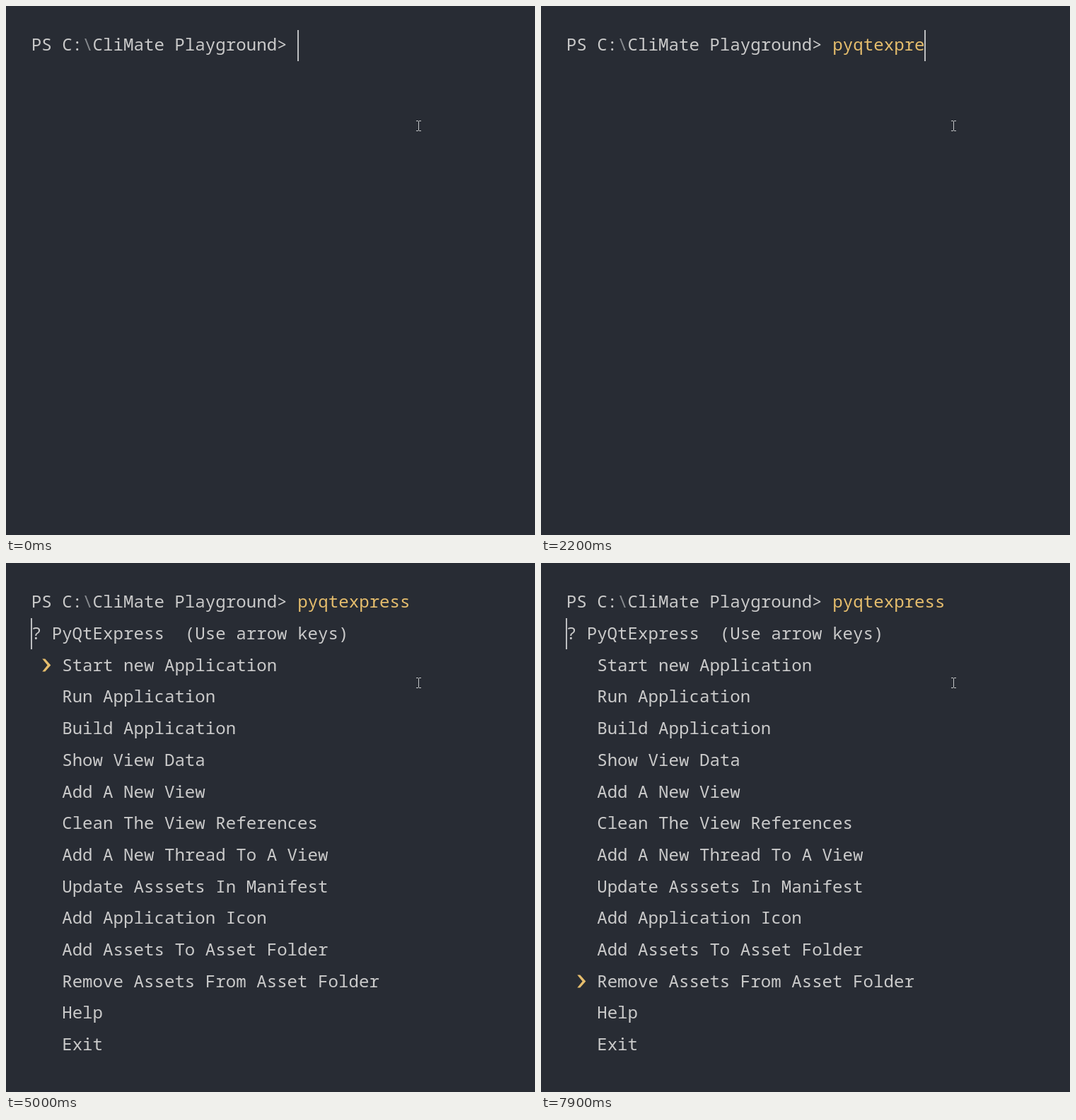
These frames come from a looping animation (748 px wide and 748 px high, 8 s). An HTML page with a canvas:

```html
<!DOCTYPE html>
<html lang="en">
<head>
<meta charset="utf-8">
<title>Terminal menu</title>
<style>
html, body { margin: 0; width: 100%; height: 100%; overflow: hidden; background: #282c34; }
canvas { display: block; }
</style>
</head>
<body>
<canvas id="stage" width="748" height="748"></canvas>
<script>
const ctx = document.getElementById('stage').getContext('2d');
const LOOP = 8000, LEFT = 35.7, CELL = 14.485, ROW = 44.7;
const BACK = '#282c34', TEXT = '#cacaca', DIM = '#868a8e', GOLD = '#e5bd6d', CARET = '#bcbec0';

const PROMPT = 'PS C:\\CliMate Playground> ';
const COMMAND = 'pyqtexpress';
const QUESTION = '? PyQtExpress  (Use arrow keys)';
const MENU = [
  'Start new Application', 'Run Application', 'Build Application', 'Show View Data',
  'Add A New View', 'Clean The View References', 'Add A New Thread To A View',
  'Update Asssets In Manifest', 'Add Application Icon', 'Add Assets To Asset Folder',
  'Remove Assets From Asset Folder', 'Help', 'Exit'
];

// Times in ms of each key press
const TYPED = [200, 400, 600, 800, 1300, 1500, 1700, 1900, 2100, 2300, 2400];
const ENTER = 2900, MENU_AT = 3600;
const DOWN = [5400, 5600, 5800, 6000, 6100, 6300, 6400, 6600, 6900, 7500, 7700, 7900];
const UP = [7100, 7300];

const passed = (times, t) => times.filter(at => at <= t).length;

function write(text, col, row, color) {
  ctx.fillStyle = color;
  ctx.fillText(text, LEFT + col * CELL, Math.round(63.3 + row * ROW));
}

function caret(col, row) {
  ctx.fillStyle = CARET;
  ctx.fillRect(Math.round(35 + col * CELL), Math.round(33.5 + row * ROW), 2, 44);
}

function pointer(row) {
  const y = 144.5 + (row - 2) * ROW;
  ctx.fillStyle = GOLD;
  ctx.beginPath();
  for (const [x, dy] of [[51.3, -9], [55.3, -9], [63.3, 0], [55.3, 9], [51.3, 9], [58.6, 0]])
    ctx.lineTo(x, y + dy);
  ctx.fill();
}

function mouse() {
  ctx.fillStyle = '#c4c6c8';
  ctx.fillRect(583, 163, 1, 13);
  for (const y of [162, 176]) {
    ctx.fillRect(580, y, 3, 1);
    ctx.fillRect(584, y, 3, 1);
  }
}

function draw(t) {
  ctx.fillStyle = BACK;
  ctx.fillRect(0, 0, 748, 748);
  ctx.font = '24.14px "Noto Sans Mono", "DejaVu Sans Mono", monospace';

  const typed = passed(TYPED, t);
  const slash = PROMPT.indexOf('\\');
  write(PROMPT.replace('\\', ' '), 0, 0, TEXT);
  write('\\', slash, 0, DIM);
  write(COMMAND.slice(0, typed), PROMPT.length, 0, GOLD);

  if (t >= MENU_AT) {
    write(QUESTION, 0, 1, TEXT);
    MENU.forEach((item, i) => write(item, 3, i + 2, TEXT));
    pointer(2 + passed(DOWN, t) - passed(UP, t));
  }
  if (t < ENTER) caret(PROMPT.length + typed, 0);
  else caret(0, 1);
  mouse();
}

const start = performance.now();
function tick() {
  draw((performance.now() - start) % LOOP);
  requestAnimationFrame(tick);
}
tick();
</script>
</body>
</html>
```
